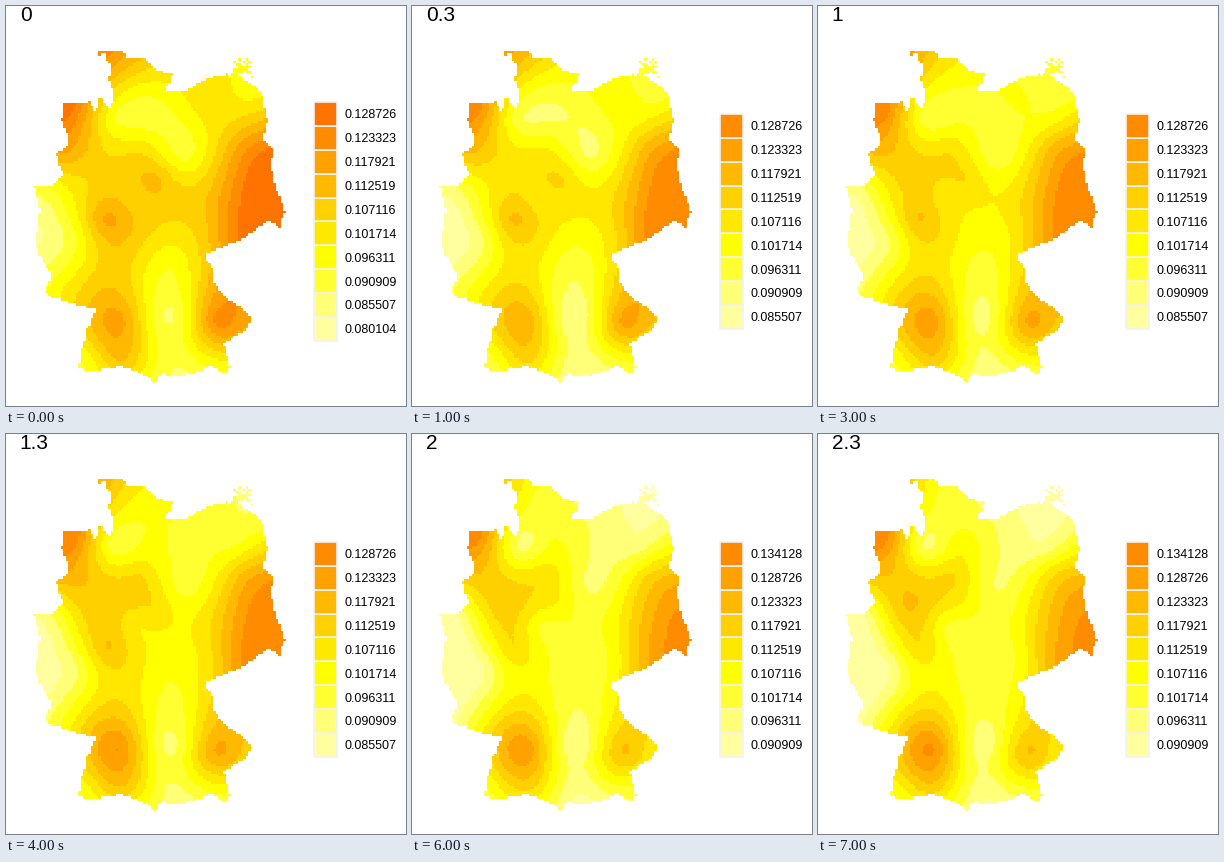
Write a matplotlib script that moves like this. It is 400 px wide and 400 px high and loops after 8 s.

```python
import numpy as np
import matplotlib.pyplot as plt
from matplotlib.animation import FuncAnimation
from matplotlib.patches import Rectangle
from matplotlib.path import Path

SIZE, CELL = 400, 2.5
STEPS = 8
LOWEST, STEP = 0.0801042, 0.0054024
KEY_W, KEY_H, LEGEND_Y = 23, 23.9, 215.4

# heat scale: pale yellows, then yellow turning to red-orange
COLORS = np.array([(255, 255, b) for b in (160, 120, 50)]
                  + [(255, 255 - 23.18 * k, 0) for k in range(7)]) / 255

# key points of the border, clockwise
BORDER = [
    (97, 44), (117, 46), (122, 52), (138, 53), (150, 65), (168, 68), (160, 84),
    (182, 84), (207, 71), (228, 68), (243, 76), (254, 84), (262, 115),
    (257, 132), (267, 143), (270, 183), (279, 206), (274, 222), (262, 215),
    (228, 237), (199, 249), (209, 265), (207, 275), (220, 291), (245, 312),
    (243, 321), (218, 338), (224, 362), (221, 370), (206, 360), (165, 371),
    (157, 367), (149, 378), (143, 371), (115, 360), (82, 365), (72, 363),
    (80, 325), (90, 304), (46, 292), (39, 286), (45, 268), (32, 248),
    (34, 205), (28, 180), (47, 180), (58, 167), (50, 148), (63, 138),
    (56, 113), (58, 97), (85, 96), (89, 107), (94, 91), (104, 103), (109, 90),
    (103, 73), (106, 63)]

# hills and hollows of the surface: x, y, level at the start and at the end
RELIEF = [
    (68, 102, 9.0, 10.4), (60, 148, 6.9, 7.5), (122, 58, 6.3, 4.9),
    (108, 112, 3.1, 3.8), (140, 106, 2.4, 5.4), (178, 150, 2.7, 3.9),
    (133, 141, 4.6, 7.1), (148, 175, 6.3, 5.6), (205, 95, 4.9, 3.1),
    (245, 85, 3.5, 2.9), (228, 115, 5.0, 3.5), (235, 140, 7.3, 6.8),
    (260, 152, 9.6, 8.8), (235, 226, 9.3, 8.8), (205, 225, 6.2, 5.5),
    (168, 205, 5.3, 4.4), (128, 192, 5.4, 4.9), (101, 213, 7.2, 6.9),
    (90, 174, 5.1, 8.1), (40, 182, 2.8, 2.3), (42, 225, 1.2, 1.8),
    (72, 235, 3.0, 2.9), (50, 285, 3.6, 3.3), (115, 315, 7.3, 10.1),
    (85, 350, 4.0, 6.3), (116, 352, 6.2, 7.7), (165, 260, 3.1, 4.3),
    (165, 310, 1.8, 3.2), (165, 355, 2.2, 3.3), (145, 325, 3.5, 5.5),
    (190, 330, 4.6, 6.0), (212, 317, 8.3, 8.1), (238, 312, 7.4, 6.5),
    (220, 358, 3.7, 4.7)]

rng = np.random.default_rng(4)


def roughen(points, rounds=2, amount=0.07):
    """Split each edge and push its middle sideways."""
    points = np.array(points, float)
    for _ in range(rounds):
        edge = np.roll(points, -1, axis=0) - points
        normal = np.column_stack([-edge[:, 1], edge[:, 0]])
        push = rng.uniform(-amount, amount, (len(points), 1))
        middle = points + edge / 2 + normal * push
        points = np.stack([points, middle], 1).reshape(-1, 2)
    return points


def kernel(a, b):
    """Thin plate spline of the distances between two point sets."""
    d2 = ((a[:, None] - b[None]) ** 2).sum(-1)
    return d2 * np.log(d2 + 1e-9)


def affine(p):
    return np.column_stack([np.ones(len(p)), p])


def spline(points, values, targets):
    n = len(points)
    system = np.zeros((n + 3, n + 3))
    system[:n, :n] = kernel(points, points)
    system[:n, n:] = affine(points)
    system[n:, :n] = affine(points).T
    rhs = np.vstack([values, np.zeros((3, values.shape[1]))])
    weights = np.linalg.solve(system, rhs)
    return np.hstack([kernel(targets, points), affine(targets)]) @ weights


side = int(SIZE / CELL)
centres = (np.arange(side) + 0.5) * CELL
cells = np.stack(np.meshgrid(centres, centres), -1).reshape(-1, 2)

land = Path(roughen(BORDER)).contains_points(cells)
for spot, spread, count in [((236, 62), (5, 4), 40), ((93, 47), (2, 3), 4)]:
    col, row = (rng.normal(spot, spread, (count, 2)) // CELL).astype(int).T
    land[row * side + col] = True

relief = np.array(RELIEF)
start, end = spline(relief[:, :2] / 100, relief[:, 2:], cells[land] / 100).T

fig = plt.figure(figsize=(4, 4), dpi=100, facecolor="white")
ax = fig.add_axes([0, 0, 1, 1])
ax.axis("off")
image = ax.imshow(np.ones((side, side, 3)), extent=(0, SIZE, SIZE, 0),
                  interpolation="nearest")
ax.set(xlim=(0, SIZE), ylim=(SIZE, 0))


def label(x, y, px):
    return ax.text(x, y, "", family="Liberation Sans", fontsize=px * 0.72,
                   color="black", va="baseline")


title = label(13.8, 15.3, 20.9)
swatches, labels = [], []
for color in COLORS:
    swatches.append(ax.add_patch(Rectangle((308, 0), KEY_W, KEY_H, facecolor=color,
                                           edgecolor="#f2f2f2", linewidth=1.2)))
    labels.append(label(338.5, 0, 12.5))


def draw(i):
    base = (i + 3) // 4
    count = 10 if i == 0 else 9
    level = start + (end - start) * i / (STEPS - 1)
    classes = np.clip(np.floor(level - base), 0, count - 1).astype(int)
    pixels = np.ones((side * side, 3))
    pixels[land] = COLORS[classes]
    image.set_data(pixels.reshape(side, side, 3))

    title.set_text(f"{round(i / 3, 1):g}")
    bottom = LEGEND_Y + count * KEY_H / 2
    for k, (box, text) in enumerate(zip(swatches, labels)):
        top = bottom - (k + 1) * KEY_H
        box.set_y(top)
        text.set_y(top + 16.3)
        text.set_text(f"{LOWEST + (base + k) * STEP:.6f}")
        box.set_visible(k < count)
        text.set_visible(k < count)
    return [image, title, *swatches, *labels]


anim = FuncAnimation(fig, draw, frames=STEPS, interval=1000, repeat=True,
                     repeat_delay=0, blit=False)
plt.show()
```
